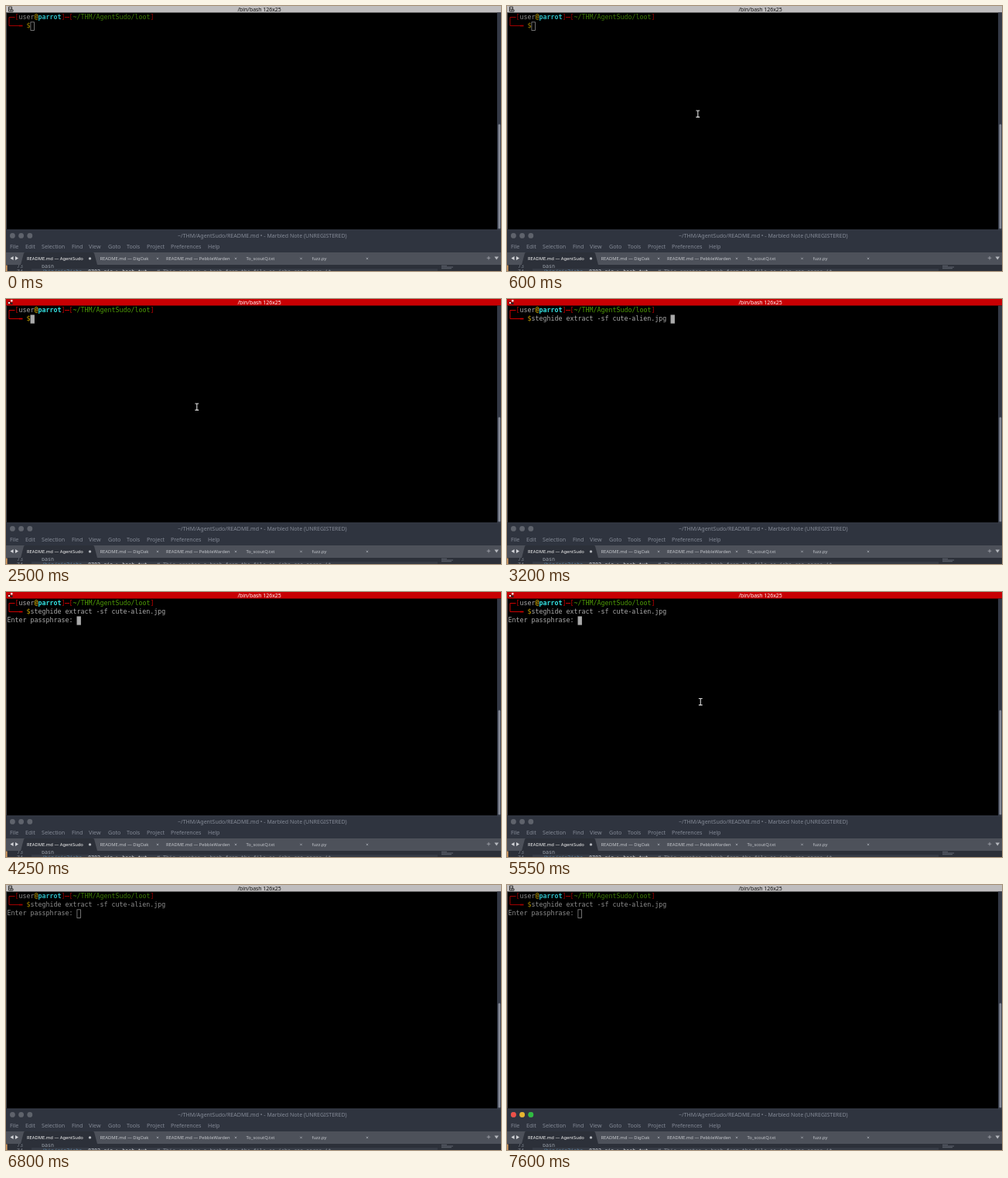
Write an HTML page that moves like this. It is 640 px wide and 342 px high and loops after 8 s.

```html
<!DOCTYPE html>
<html lang="en">
<head>
<meta charset="utf-8">
<title>Terminal and editor</title>
<style>
  html, body { margin: 0; width: 100%; height: 100%; overflow: hidden; background: #000; }
  svg { display: block; width: 100vw; height: 100vh; }
  text { white-space: pre; font-family: "Noto Sans", sans-serif; }
  .mono { font: 8.306px "DejaVu Sans Mono", monospace; }
  .code { font: 6.7px "DejaVu Sans Mono", monospace; }
  .bold { font-weight: bold; }
  #term {
    --bar: #bfbdbe; --barText: #111; --red: #a00000; --fg: #8c8c8c;
    --green: #3c7806; --yellow: #a38600; --cyan: #2ebbc4;
  }
  #term.focused {
    --bar: #c80003; --barText: #fff; --red: #cc0000; --fg: #aaa;
    --green: #4e9a06; --yellow: #c4a000; --cyan: #34e2e2;
  }
</style>
</head>
<body>
<svg id="stage" viewBox="0 0 640 342" preserveAspectRatio="none"></svg>
<script>
const NS = "http://www.w3.org/2000/svg";
const stage = document.getElementById("stage");

function add(parent, tag, attrs, content) {
  const el = document.createElementNS(NS, tag);
  for (const key in attrs) el.setAttribute(key, attrs[key]);
  if (content !== undefined) el.textContent = content;
  return parent.appendChild(el);
}
const rect = (parent, x, y, width, height, fill, extra) =>
  add(parent, "rect", { x, y, width, height, fill, ...extra });
const label = (parent, x, y, content, fill, size) =>
  add(parent, "text", { x, y, fill, "font-size": size }, content);
const path = (parent, d, stroke, width = 1) =>
  add(parent, "path", { d, stroke, fill: "none", "stroke-width": width });
const show = (el, visible) => el.style.display = visible ? "" : "none";

// Terminal grid
const CELL = 5, ROW = 11;
const colX = col => 1.5 + col * CELL;
const rowY = row => 9.4 + row * ROW;
const cells = (parent, col, row, content, color, bold) =>
  add(parent, "text", {
    x: colX(col), y: rowY(row) + 8, fill: `var(--${color})`,
    class: bold ? "mono bold" : "mono"
  }, content);

const term = add(stage, "g", { id: "term" });
rect(term, 0, 0, 640, 289, "#000");
rect(term, 0, 0, 640, 8.5, "var(--bar)");
rect(term, 0, 8.5, 1, 280, "#4a4a4e");
rect(term, 635, 8.5, 5, 280.4, "#343946");
rect(term, 636.5, 152.5, 2.7, 135, "#868b98", { rx: 1.3 });
label(term, 299.5, 6.5, "/bin/bash 126x25", "var(--barText)", 6.9);

// Split-pane icon: outlined while idle, filled squares while focused
const idleIcon = path(term, "M3.5 1.2H7.5V4H3.5ZM3.5 4V7H6M6 4.8H9V7H6Z", "#111", 0.8);
const focusIcon = add(term, "g", {});
rect(focusIcon, 2.5, 3.5, 3, 3, "#222");
rect(focusIcon, 6, 1, 2.5, 2.5, "#eee");
rect(focusIcon, 3, 4, 2, 2, "#eee");
rect(focusIcon, 6, 4.5, 2.5, 2.5, "#222");

path(term, "M11.5 14.5H4V25.5H17", "var(--red)");
path(term, "M17 25.5H21.5", "var(--red)", 1.7);
path(term, "M76 14.5H82", "var(--red)");
cells(term, 2, 0, "[", "red");
cells(term, 3, 0, "user", "fg");
cells(term, 7, 0, "@", "yellow", true);
cells(term, 8, 0, "parrot", "cyan", true);
cells(term, 14, 0, "]", "red");
cells(term, 16, 0, "[", "red");
cells(term, 17, 0, "~/THM/AgentSudo/loot", "green");
cells(term, 37, 0, "]", "red");
cells(term, 5, 1, "$", "yellow");
const command = cells(term, 6, 1, "steghide extract -sf cute-alien.jpg", "fg");
const prompt = cells(term, 0, 2, "Enter passphrase:", "fg");
const block = rect(term, 0, 0, CELL + 0.4, ROW + 0.2, "#aaa");
const hollow = rect(term, 0.4, 0.4, CELL - 0.4, ROW - 0.4, "none", { stroke: "#8c8c8c", "stroke-width": 0.8 });

const mouse = add(stage, "g", {});
path(mouse, "M-2.4 -4.2H-.7L0 -3.7L.7 -4.2H2.4M0 -3.7V3.7M-2.4 4.2H-.7L0 3.7L.7 4.2H2.4", "#ddd", 1.1);

// Editor window
const editor = add(stage, "g", {});
rect(editor, 0, 288.6, 640, 54, "#2f343f");
rect(editor, 0, 288.6, 640, 0.8, "#3d424e");
const lights = ["#ee5048", "#e8b62f", "#2fbd40"].map((color, i) => {
  const circle = { cx: 8.4 + i * 11.2, cy: 296.4, r: 3.4 };
  add(editor, "circle", { ...circle, fill: "#5f636c" });
  return add(editor, "circle", { ...circle, fill: color });
});
label(editor, 222, 299, "~/THM/AgentSudo/README.md • - Marbled Note (UNREGISTERED)", "#858b97", 7.05);

const menu = {
  File: 5, Edit: 25, Selection: 46, Find: 85, View: 107,
  Goto: 132, Tools: 156, Project: 182, Preferences: 213, Help: 261
};
for (const name in menu) label(editor, menu[name], 313.4, name, "#858b97", 7.1);

rect(editor, 0, 318, 640, 16, "#4d515a");
add(editor, "path", { d: "M19 334L23 319Q23.5 318 25 318H112Q113.5 318 114 319L118 334Z", fill: "#2c3039" });
add(editor, "path", { d: "M9.5 323V328L5.5 325.5ZM12 323V328L16 325.5Z", fill: "#d4d6da" });
const tabs = [
  [27, "README.md — AgentSudo"], [121.5, "README.md — DigOak", 196],
  [207, "README.md — PebbleWarden", 297], [310.5, "To_scoutQ.txt", 381.5], [395.5, "fuzz.py", 467]
];
for (const [x, name, close] of tabs) {
  label(editor, x, 327.8, name, close ? "#c3c6cb" : "#f4f4f4", 5.82);
  if (close) path(editor, `M${close - 1.2} 324.7l2.4 2.4m0 -2.4l-2.4 2.4`, "#989ca4", 0.9);
}
add(editor, "circle", { cx: 108.5, cy: 325.9, r: 1.7, fill: "#b5b8be" });
path(editor, "M621.7 325.2H626.3M624 322.9V327.5", "#a5a8af", 0.8);
add(editor, "path", { d: "M631.5 323.5H637L634.2 327.5Z", fill: "#b5b8be" });

const page = add(editor, "svg", { x: 0, y: 334, width: 640, height: 8, viewBox: "0 334 640 8" });
rect(page, 0, 334, 640, 8, "#2c3039");
rect(page, 33, 339, 525, 3, "#363b45");
rect(page, 0, 334.5, 1.6, 8, "#d69a5c");
const code = (x, y, content, fill) => add(page, "text", { x, y, fill, class: "code" }, content);
code(14, 338, "73", "#777d87");
code(46, 338, "bash", "#9ba1aa");
code(14, 344.6, "74", "#858b95");
code(46, 344.6, "/bin/zip2john", "#5f86a6");
code(106, 344.6, "8702.zip > hash.txt", "#d5d8dd");
code(195, 344.6, "# This creates a hash from the file so john can parse it", "#8d939e");
path(page, "M563 335.3H570M563 337H578M563 338.7H576", "#737984", 0.7);

// Timeline
const LOOP = 8000;
const within = (t, from, to) => t >= from && t < to;
const mix = (a, b, k) => a + (b - a) * k;
const ramp = (t, from, to) => Math.min(1, Math.max(0, (t - from) / (to - from)));

function mousePosition(t) {
  if (within(t, 50, 2800)) {
    const k = 1 - (1 - ramp(t, 50, 400)) ** 2;
    return [mix(283, 246.8, k), mix(284, 139.2, k)];
  }
  if (within(t, 5550, 5700)) {
    const k = ramp(t, 5550, 5690) ** 1.4;
    return [mix(250.2, 285, k), mix(141.5, 286, k)];
  }
  return null;
}

function draw(t) {
  const focused = within(t, 2350, 6750);
  const typed = t >= 2800, entered = t >= 4250;
  const blinkedOff = within(t, 3450, 4050) || within(t, 4950, 5550) || within(t, 6150, 6750);
  const col = entered ? 18 : typed ? 42 : 6;
  const row = entered ? 2 : 1;

  term.setAttribute("class", focused ? "focused" : "");
  show(idleIcon, !focused);
  show(focusIcon, focused);
  show(command, typed);
  show(prompt, entered);
  for (const cursor of [block, hollow])
    cursor.setAttribute("transform", `translate(${colX(col)} ${rowY(row)})`);
  show(block, focused && !blinkedOff);
  show(hollow, !focused);

  const at = mousePosition(t);
  show(mouse, at);
  if (at) mouse.setAttribute("transform", `translate(${at[0]} ${at[1]})`);
  for (const light of lights) light.setAttribute("opacity", ramp(t, 6800, 7000));
}

const start = performance.now();
function tick() {
  draw((performance.now() - start) % LOOP);
  requestAnimationFrame(tick);
}
tick();
</script>
</body>
</html>
```
